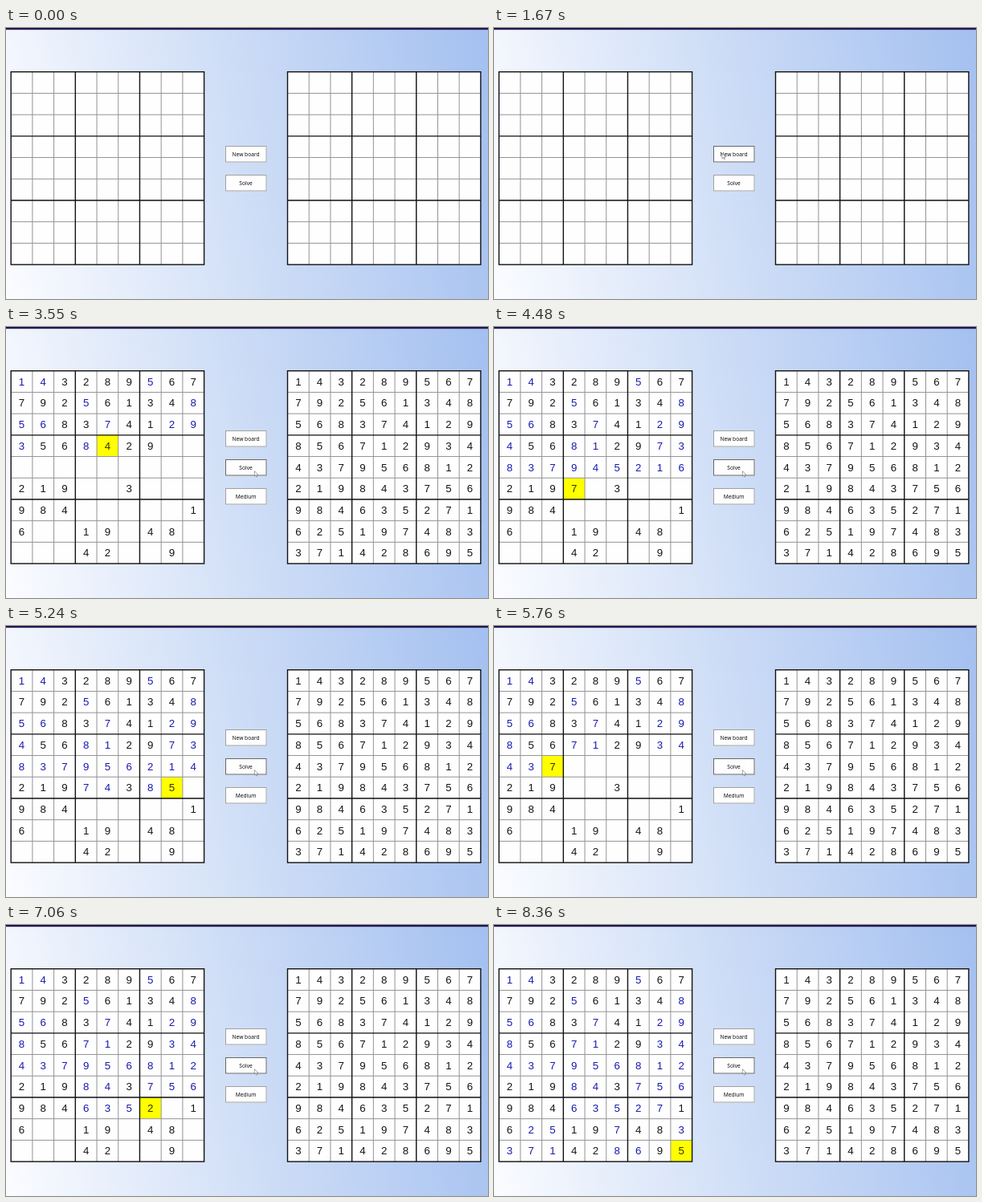
Write an HTML page with a canvas that moves like this. It is 600 px wide and 338 px high and loops after 8.39 s.

```html
<!DOCTYPE html>
<html lang="en">
<head>
<meta charset="utf-8">
<title>Sudoku solver</title>
<style>
  html, body { margin: 0; width: 100%; height: 100%; overflow: hidden; }
  canvas { display: block; width: 600px; height: 338px; }
</style>
</head>
<body>
<canvas id="stage" width="600" height="338"></canvas>
<script>
const ctx = document.getElementById('stage').getContext('2d');
const LOOP = 8390;
const FPS = 33;
const TOP = 54.7, SIDE = 240.4, CELL = SIDE / 9;
const LEFT_X = 6.2, RIGHT_X = 350.5;
const BOARD_TICK = 58, PRESS_TICK = 55, SOLVE_TICK = 93, SOLVER_TICK = 94;

const puzzle = [
  '003289067', '792061340', '008304100',
  '056002900', '000000000', '219003000',
  '984000001', '600190480', '000420090'
].join('').split('').map(Number);

function fits(board, cell, digit) {
  const row = Math.floor(cell / 9), col = cell % 9;
  const boxRow = row - row % 3, boxCol = col - col % 3;
  for (let i = 0; i < 9; i++) {
    const boxCell = (boxRow + Math.floor(i / 3)) * 9 + boxCol + i % 3;
    if (board[row * 9 + i] === digit || board[i * 9 + col] === digit ||
        board[boxCell] === digit) return false;
  }
  return true;
}

// Backtracking search that records the board after every placement.
function solve(board, steps) {
  const cell = board.indexOf(0);
  if (cell < 0) return true;
  for (let digit = 1; digit <= 9; digit++) {
    if (!fits(board, cell, digit)) continue;
    board[cell] = digit;
    steps.push({ cell, board: board.slice() });
    if (solve(board, steps)) return true;
    board[cell] = 0;
  }
  return false;
}

const steps = [];
const solution = puzzle.slice();
solve(solution, steps);

const backdrop = ctx.createLinearGradient(-20, 226, 620, 112);
backdrop.addColorStop(0, '#fbfcff');
backdrop.addColorStop(0.45, '#d2e0f7');
backdrop.addColorStop(1, '#a4c0f0');

function drawBackground() {
  ctx.fillStyle = backdrop;
  ctx.fillRect(0, 0, 600, 338);
  ctx.fillStyle = '#21164f';
  ctx.fillRect(0, 0, 600, 2.2);
}

function gridLine(x, i, width, color) {
  const d = i * CELL;
  ctx.strokeStyle = color;
  ctx.lineWidth = width;
  ctx.beginPath();
  ctx.moveTo(x + d, TOP);
  ctx.lineTo(x + d, TOP + SIDE);
  ctx.moveTo(x, TOP + d);
  ctx.lineTo(x + SIDE, TOP + d);
  ctx.stroke();
}

function drawBoard(x, board, active = -1, showSolved = false) {
  ctx.fillStyle = '#fefefe';
  ctx.fillRect(x, TOP, SIDE, SIDE);
  if (active >= 0) {
    ctx.fillStyle = '#ffff00';
    ctx.fillRect(x + active % 9 * CELL, TOP + Math.floor(active / 9) * CELL, CELL, CELL);
  }
  for (let i = 1; i < 9; i++) if (i % 3) gridLine(x, i, 1, '#939393');
  for (let i = 3; i < 9; i += 3) gridLine(x, i, 1.4, '#111');
  ctx.strokeStyle = '#111';
  ctx.lineWidth = 1.4;
  ctx.strokeRect(x, TOP, SIDE, SIDE);
  if (!board) return;

  ctx.font = '13.3px "Liberation Sans", Arial, sans-serif';
  ctx.textAlign = 'center';
  board.forEach((digit, cell) => {
    if (!digit) return;
    const found = showSolved && !puzzle[cell];
    ctx.fillStyle = cell === active ? '#333300' : found ? '#1a1aae' : '#151515';
    ctx.fillText(digit, x + (cell % 9 + 0.5) * CELL,
      TOP + (Math.floor(cell / 9) + 0.5) * CELL + 4.7);
  });
}

function drawButton(label, y, focused) {
  ctx.fillStyle = '#fefefe';
  ctx.fillRect(273, y, 51.5, 20.5);
  ctx.strokeStyle = focused ? '#666' : '#a0a0a0';
  ctx.lineWidth = 1;
  ctx.strokeRect(273.5, y + 0.5, 50.5, 19.5);
  ctx.fillStyle = '#000';
  ctx.font = '500 6.7px "Open Sans", "Noto Sans", sans-serif';
  ctx.textAlign = 'center';
  ctx.fillText(label, 298.6, y + 12.8);
}

function drawCursor(x, y) {
  const outline = [[0, 0], [0, 6.4], [1.5, 5.1], [2.5, 7.4], [3.5, 7], [2.6, 4.8], [4.5, 4.6]];
  ctx.beginPath();
  outline.forEach(([dx, dy]) => ctx.lineTo(x + dx, y + dy));
  ctx.closePath();
  ctx.fillStyle = '#fff';
  ctx.fill();
  ctx.strokeStyle = '#666';
  ctx.lineWidth = 0.6;
  ctx.stroke();
}

function glide(time, start, end, from, to) {
  const p = Math.min(1, Math.max(0, (time - start) / (end - start)));
  const e = p * p * (3 - 2 * p);
  return from.map((v, i) => v + (to[i] - v) * e);
}

function cursorAt(time) {
  const rest = [284, 156.4];
  return time < 1900
    ? glide(time, 330, 1150, [499, 232], rest)
    : glide(time, 1900, 2500, rest, [309.3, 179.6]);
}

function draw(time) {
  const tick = Math.floor((time + 5) * FPS / 1000);
  const hasBoard = tick >= BOARD_TICK;
  drawBackground();

  // One placement per tick, with a single pause during the search.
  const index = tick - SOLVER_TICK - (tick >= 133 ? 1 : 0);
  const step = index >= 0 ? steps[Math.min(index, steps.length - 1)] : null;
  if (step) drawBoard(LEFT_X, step.board, step.cell, true);
  else drawBoard(LEFT_X, hasBoard ? puzzle : null);
  drawBoard(RIGHT_X, hasBoard ? solution : null);

  const y = hasBoard ? 129 : 147;
  const solving = tick >= SOLVE_TICK;
  drawButton('New board', y, tick >= PRESS_TICK && !solving);
  drawButton('Solve', y + 36, solving);
  if (hasBoard) drawButton('Medium', y + 72, false);

  if (tick >= 11) drawCursor(...cursorAt(tick * 1000 / FPS));
}

const origin = performance.now();
function loop() {
  draw((performance.now() - origin) % LOOP);
  requestAnimationFrame(loop);
}
loop();
</script>
</body>
</html>
```
